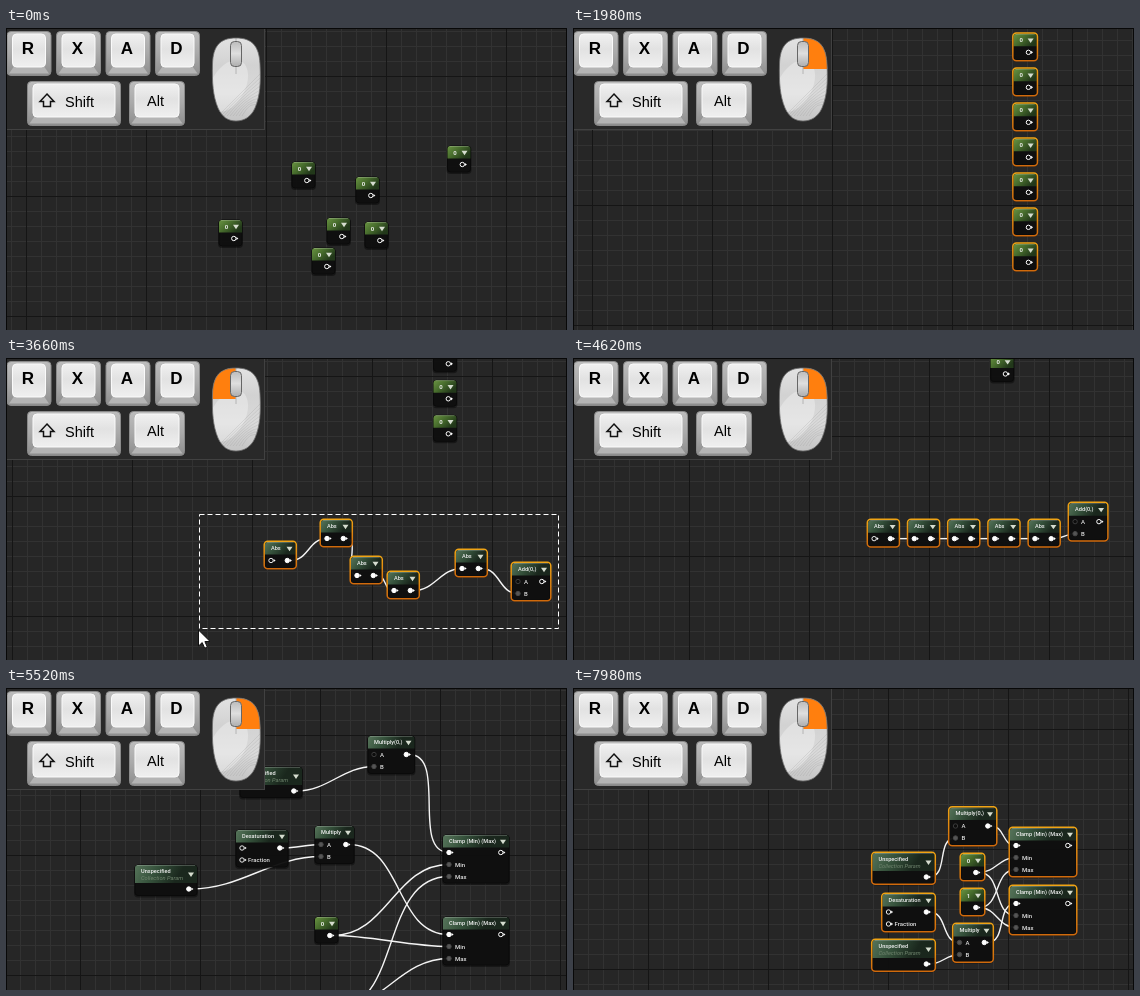
An HTML page with a canvas for the animation above (8 s loop, 561 by 302 pixels).

```html
<!DOCTYPE html>
<html lang="en">
<head>
<meta charset="utf-8">
<title>Node graph layout</title>
<style>
html, body { margin: 0; width: 561px; height: 302px; overflow: hidden; background: #262626; }
canvas { display: block; }
</style>
</head>
<body>
<canvas id="stage" width="561" height="302"></canvas>
<script>
const W = 561, H = 302, LOOP = 8000, STEP = 60;
const g = document.getElementById('stage').getContext('2d');

const clamp = p => Math.max(0, Math.min(1, p));
const smooth = p => p * p * (3 - 2 * p);
const linear = p => p;
const mix = (a, b, p) => a + (b - a) * p;

// Camera keys: time, x, y, easing towards this key
const PAN = [
  [1680, 0, 0, linear],
  [2340, -2, -258, smooth],
  [2760, -14, -270, linear],
  [4200, -14, -270, linear],
  [5100, -53, -506, p => p ** 1.8],
  [5520, -66, -721, p => 1 - (1 - p) ** 1.2],
  [5640, -66, -726, linear],
  [7860, -66, -726, linear],
  [7980, -65, -727, linear]
];

function camera(t) {
  const i = PAN.findIndex(k => k[0] > t);
  if (i === 0) return [0, 0];
  if (i < 0) return PAN[PAN.length - 1].slice(1, 3);
  const a = PAN[i - 1], b = PAN[i];
  const p = b[3]((t - a[0]) / (b[0] - a[0]));
  return [mix(a[1], b[1], p), mix(a[2], b[2], p)];
}

// Node kinds: size, first pin row, input labels
const KINDS = {
  num: { w: 23, h: 26, row: 18.5, ins: [] },
  abs: { w: 30.5, h: 26, row: 18.5, ins: [''] },
  add: { w: 38, h: 37, row: 18.5, ins: ['A', 'B'] },
  mul: { w: 46.5, h: 37.5, row: 18.5, ins: ['A', 'B'] },
  par: { w: 62, h: 30.5, row: 24, ins: [] },
  des: { w: 52, h: 37, row: 18, ins: ['', 'Fraction'] },
  clp: { w: 66, h: 48, row: 17.5, ins: ['', 'Min', 'Max'] }
};

// Places are [x, y, arranged x, arranged y], measured under the two given camera positions
function makeNode(kind, title, place, from, to) {
  const [x, y, x2, y2] = place;
  return {
    kind, title, ...KINDS[kind], used: new Set(),
    a: [x - from[0], y - from[1]], b: [x2 - to[0], y2 - to[1]]
  };
}

const CAM2 = [-14, -270], CAM3 = [-66, -721], CAM4 = [-65, -727];
const clampTitle = 'Clamp (Min) (Max)';

const numbers = [[441.5, 118], [286, 134], [350, 149], [321, 190], [213, 192], [359, 194], [306, 220]]
  .map((p, i) => makeNode('num', '0', [...p, 441.5, 117.3 + i * 35], [0, 0], [0, 0]));

const chain = [[259, 184], [315, 162], [345, 199], [382, 214], [450, 192]]
  .map((p, i) => makeNode('abs', 'Abs', [...p, 305 + i * 40.2, 222], CAM2, CAM2));
chain.push(makeNode('add', 'Add(0,)', [506, 205, 506, 205], CAM2, CAM2));

const graph = [
  ['par', 'Unspecified', 234, 79, 299.5, 165],
  ['mul', 'Multiply(0,)', 362, 48, 376.5, 119.5],
  ['des', 'Desaturation', 230, 142, 309.5, 206],
  ['mul', 'Multiply', 309, 138, 380.5, 236],
  ['par', 'Unspecified', 129, 177, 299.5, 252],
  ['clp', clampTitle, 437, 147, 437, 140],
  ['clp', clampTitle, 437, 229, 437, 198],
  ['num', '0', 309, 229, 388, 166],
  ['num', '1', 309, 303, 388, 201]
].map(([kind, title, ...place]) => makeNode(kind, title, place, CAM3, CAM4));
graph[3].w = 39;

// Wires: source node, target node, target input
const GROUPS = [
  { nodes: numbers, wires: [], drag: [180, 660, 840], box: [489, 98, 206, 262], key: 1020, until: 3060 },
  {
    nodes: chain, wires: [[0, 1, 0], [1, 2, 0], [2, 3, 0], [3, 4, 0], [4, 5, 1]],
    drag: [3060, 3660, 3720], box: [553, 156, 193, 271], key: 3840, until: 6060
  },
  {
    nodes: graph,
    wires: [[0, 1, 1], [1, 5, 0], [2, 3, 0], [4, 3, 1], [3, 6, 0], [7, 5, 1], [7, 6, 1], [8, 5, 2], [8, 6, 2]],
    drag: [6060, 6720, 6960], box: [535, 30, 127, 300], key: 7080, until: LOOP
  }
];
for (const { nodes, wires } of GROUPS) {
  for (const [from, to, pin] of wires) {
    nodes[from].used.add('out');
    nodes[to].used.add(pin);
  }
}

function gradient(x, y, x2, y2, colors) {
  const fill = g.createLinearGradient(x, y, x2, y2);
  colors.forEach((c, i) => fill.addColorStop(i / (colors.length - 1), c));
  return fill;
}

const vertical = (y, h, ...colors) => gradient(0, y, 0, y + h, colors);

function rounded(x, y, w, h, r, fill, stroke, width = 1) {
  g.beginPath();
  g.roundRect(x, y, w, h, r);
  if (fill) { g.fillStyle = fill; g.fill(); }
  if (stroke) { g.strokeStyle = stroke; g.lineWidth = width; g.stroke(); }
}

function polygon(points, fill, stroke, width = 1) {
  g.beginPath();
  points.forEach(([x, y]) => g.lineTo(x, y));
  g.closePath();
  if (fill) { g.fillStyle = fill; g.fill(); }
  if (stroke) { g.strokeStyle = stroke; g.lineWidth = width; g.stroke(); }
}

function label(text, x, y, font, color, align = 'left') {
  g.font = font;
  g.fillStyle = color;
  g.textAlign = align;
  g.textBaseline = 'middle';
  g.fillText(text, x, y);
}

function drawGrid([cx, cy]) {
  g.fillStyle = '#262626';
  g.fillRect(0, 0, W, H);
  for (const [gap, color] of [[15, '#323232'], [120, '#151515']]) {
    const start = v => ((v % gap) + gap) % gap;
    g.fillStyle = color;
    for (let x = start(260 + cx); x < W; x += gap) g.fillRect(Math.round(x), 0, 1, H);
    for (let y = start(168 + cy); y < H; y += gap) g.fillRect(0, Math.round(y), W, 1);
  }
}

function pin(x, y, fill, stroke, arrow) {
  g.beginPath();
  g.arc(x, y, 2.2, 0, 7);
  g.fillStyle = fill;
  g.fill();
  g.strokeStyle = stroke;
  g.lineWidth = 1;
  g.stroke();
  if (arrow) polygon([[x + 2.6, y - 1.6], [x + 4.6, y], [x + 2.6, y + 1.6]], '#fff');
}

const inPin = (n, i) => [n.x + 6, n.y + n.row + i * 12];
const outPin = n => [n.x + n.w - 8.2, n.y + n.row];

function drawWire([x, y], [x2, y2]) {
  x += 3;
  const bend = Math.abs(x2 - x) * 0.3 + Math.abs(y2 - y) * 0.25 + 2;
  g.beginPath();
  g.moveTo(x, y);
  g.bezierCurveTo(x + bend, y, x2 - bend, y2, x2, y2);
  g.strokeStyle = '#f4f4f4';
  g.lineWidth = 1.4;
  g.stroke();
}

function drawNode(n, selected) {
  const { x, y, w, h, kind, title } = n;
  const isNum = kind === 'num', isParam = kind === 'par';
  const head = isParam ? 18 : 12.5;
  rounded(x - 1, y, w + 2, h + 2, 4, 'rgba(0,0,0,.4)');
  rounded(x, y, w, h, 3, 'rgba(15,15,15,.93)', '#0a0a0a');
  const tint = isNum ? ['#6a9442', '#466b2c', '#22381a'] : ['#56745a', '#34503a', '#1a271d'];
  rounded(x, y, w, head, [3, 3, 0, 0], gradient(x, y, x + w * 0.6, y + head * 1.2, tint));
  g.fillStyle = 'rgba(255,255,255,.25)';
  g.fillRect(x + 2, y, w - 4, 0.8);
  if (selected) rounded(x - 0.8, y - 0.8, w + 1.6, h + 1.6, 3.5, null, vertical(y, h, '#f0a414', '#d06a0c'), 1.5);

  if (isNum) label(title, x + 7.5, y + 6.8, 'bold 6px Roboto, sans-serif', '#eee', 'center');
  else label(title, x + 6, y + 6.2, '500 5.6px Roboto, sans-serif', '#f2f2f2');
  if (isParam) label('Collection Param', x + 6, y + 13.5, 'italic 5.7px Roboto, sans-serif', '#71866f');
  const ax = x + w - 6, ay = y + head / 2 - 1.5;
  polygon([[ax - 3, ay], [ax + 3, ay], [ax, ay + 4.4]], '#d5dccf');

  n.ins.forEach((text, i) => {
    const [px, py] = inPin(n, i), used = n.used.has(i);
    if (used) pin(px, py, text ? '#555' : '#fff', text ? '#484848' : '#fff', !text);
    else pin(px, py, '#0d0d0d', text === 'A' ? '#3c3c3c' : '#eee', text !== 'A');
    label(text, px + 6, py + 0.3, '500 6px Roboto, sans-serif', '#e4e4e4');
  });
  const used = n.used.has('out');
  pin(...outPin(n), used ? '#fff' : '#0d0d0d', '#fff', true);
}

// Corners of the selection box at time t
function dragBox({ drag: [start, end], box: [x, y, x2, y2] }, t) {
  const p = smooth(clamp((t - start) / (end - start)));
  return [x, y, mix(x, x2, p), mix(y, y2, p)];
}

function isSelected(group, n, t) {
  const [start, , release] = group.drag;
  if (t <= start || t >= group.until) return false;
  const at = Math.min(t, release), [cx, cy] = camera(at);
  const [right, top, left, bottom] = dragBox(group, at);
  const x = n.a[0] + cx, y = n.a[1] + cy;
  return x < right && x + n.w > left && y < bottom && y + n.h > top;
}

function drawGroup(group, t, [cx, cy]) {
  const { nodes, wires, key } = group;
  for (const n of nodes) {
    const [x, y] = t >= key + 120 ? n.b : n.a;
    n.x = x + cx;
    n.y = y + cy;
  }
  for (const [from, to, i] of wires) drawWire(outPin(nodes[from]), inPin(nodes[to], i));
  for (const n of nodes) drawNode(n, isSelected(group, n, t));
}

function drawMarquee(group, t) {
  const [start, , release] = group.drag;
  if (t <= start || t >= release) return;
  const [x, y, x2, y2] = dragBox(group, t).map(v => Math.round(v) + 0.5);
  g.setLineDash([5, 3]);
  g.strokeStyle = '#fff';
  g.lineWidth = 1;
  g.strokeRect(x2, y, x - x2 - 1, y2 - y - 1);
  g.setLineDash([]);
}

function cursorAt(t) {
  const [first, second, third] = GROUPS;
  if (t >= 60 && t < 180) {
    const p = (t - 60) / 120;
    return [mix(545, 489, p), mix(70, 98, p)];
  }
  if (t >= 180 && t < 1680) return dragBox(first, t).slice(2);
  if (t >= 2760 && t < 3060) {
    const p = smooth((t - 2760) / 300);
    return [mix(206, 553, p), mix(262, 156, p)];
  }
  if (t >= 3060 && t < 4200) return dragBox(second, t).slice(2);
  if (t >= 6060 && t < 7860) return dragBox(third, t).slice(2);
  return null;
}

function drawCursor([x, y]) {
  const shape = [[0, 0], [0, 16], [3.7, 12.6], [6.2, 18.2], [8.8, 17], [6.4, 11.6], [11.5, 11.4]];
  polygon(shape.map(([px, py]) => [x + px - 0.5, y + py + 1]), '#fff', '#111');
}

function drawKey(x, y, w, h, down) {
  rounded(x, y, w, h, 4, vertical(y, h, '#bdbdbd', '#a9a9a9', '#8d8d8d'), '#8a8a8a');
  polygon([[x + 2, y + h - 2], [x + 7, y + h - 9], [x + w - 7, y + h - 9], [x + w - 2, y + h - 2]], '#b4b4b4');
  const face = down ? ['#ffa347', '#ff8000', '#f07800'] : ['#f3f3f3', '#e2e2e2', '#efefef'];
  rounded(x + 5.5, y + 2.5, w - 11, h - 11, 4, vertical(y, h - 9, ...face), down ? '#ffb870' : '#fafafa');
}

function drawMouse(left, right) {
  const body = new Path2D('M230 10C214 10 207 18 206.5 36C206 55 207 68 212 80C216 89 222 93 230 93' +
    'C238 93 245 89 249 80C254 68 255 55 254 36C253 18 246 10 230 10Z');
  g.save();
  g.fillStyle = vertical(10, 83, '#e2e2e2', '#d2d2d2', '#dadada', '#c4c4c4');
  g.fill(body);
  g.clip(body);
  g.fillStyle = 'rgba(255,255,255,.3)';
  g.beginPath();
  g.ellipse(222, 58, 17, 28, 0.5, 0, 7);
  g.fill();
  g.strokeStyle = 'rgba(120,120,120,.16)';
  g.lineWidth = 1;
  for (let i = 0; i < 9; i++) {
    g.beginPath();
    g.moveTo(212 + i * 3, 88);
    g.quadraticCurveTo(228 + i * 2, 72, 254, 46 + i * 4);
    g.stroke();
  }
  g.fillStyle = '#ff7f0e';
  if (left) g.fillRect(205, 10, 25, 31);
  if (right) g.fillRect(230, 10, 26, 31);
  g.strokeStyle = '#b4b4b4';
  g.beginPath();
  g.moveTo(230, 10);
  g.lineTo(230, 46);
  g.stroke();
  g.restore();
  g.strokeStyle = '#6c6c6c';
  g.lineWidth = 0.8;
  g.stroke(body);
  rounded(224.5, 13.5, 11, 25, 4, vertical(13, 25, '#bbb', '#dedede', '#b0b0b0'), '#666');
}

function drawPanel(t) {
  g.fillStyle = '#292929';
  g.fillRect(0, 0, 259, 102);
  g.fillStyle = '#414141';
  g.fillRect(0, 101, 259, 1);
  g.fillRect(258, 0, 1, 102);

  const keyDown = GROUPS.some(({ key }) => t >= key && t < key + 240 - (key > 7000 ? 60 : 0));
  [...'RXAD'].forEach((c, i) => {
    const x = 1 + i * 49.5;
    drawKey(x, 3.5, 44, 44, i === 0 && keyDown);
    label(c, x + 21, 21.3, 'bold 17px "Liberation Sans", Arial, sans-serif', '#000', 'center');
  });
  drawKey(21.5, 53.5, 93, 44);
  drawKey(123.5, 53.5, 55, 44);
  label('Shift', 59, 75, '14.5px "Liberation Sans", Arial, sans-serif', '#000');
  label('Alt', 141, 74, '14.5px "Liberation Sans", Arial, sans-serif', '#000');
  polygon([[41, 66], [48, 73.5], [44.5, 73.5], [44.5, 78.5], [37.5, 78.5], [37.5, 73.5], [34, 73.5]], null, '#111', 1.5);

  const left = GROUPS.some(({ drag }) => t >= drag[0] && t < drag[2]);
  const right = [[1680, 2760], [4200, 5640], [7860, LOOP]].some(([a, b]) => t >= a && t < b);
  drawMouse(left, right);
}

function draw(t) {
  const cam = camera(t);
  drawGrid(cam);
  for (const group of GROUPS) drawGroup(group, t, cam);
  for (const group of GROUPS) drawMarquee(group, t);
  drawPanel(t);
  const cursor = cursorAt(t);
  if (cursor) drawCursor(cursor);
  g.fillStyle = '#080808';
  g.fillRect(0, 0, W, 1);
  g.fillRect(0, 0, 1, H);
  g.fillRect(W - 1, 0, 1, H);
}

const begin = performance.now();
function tick() {
  const t = (performance.now() - begin) % LOOP;
  draw(t - t % STEP);
  requestAnimationFrame(tick);
}
tick();
</script>
</body>
</html>
```
